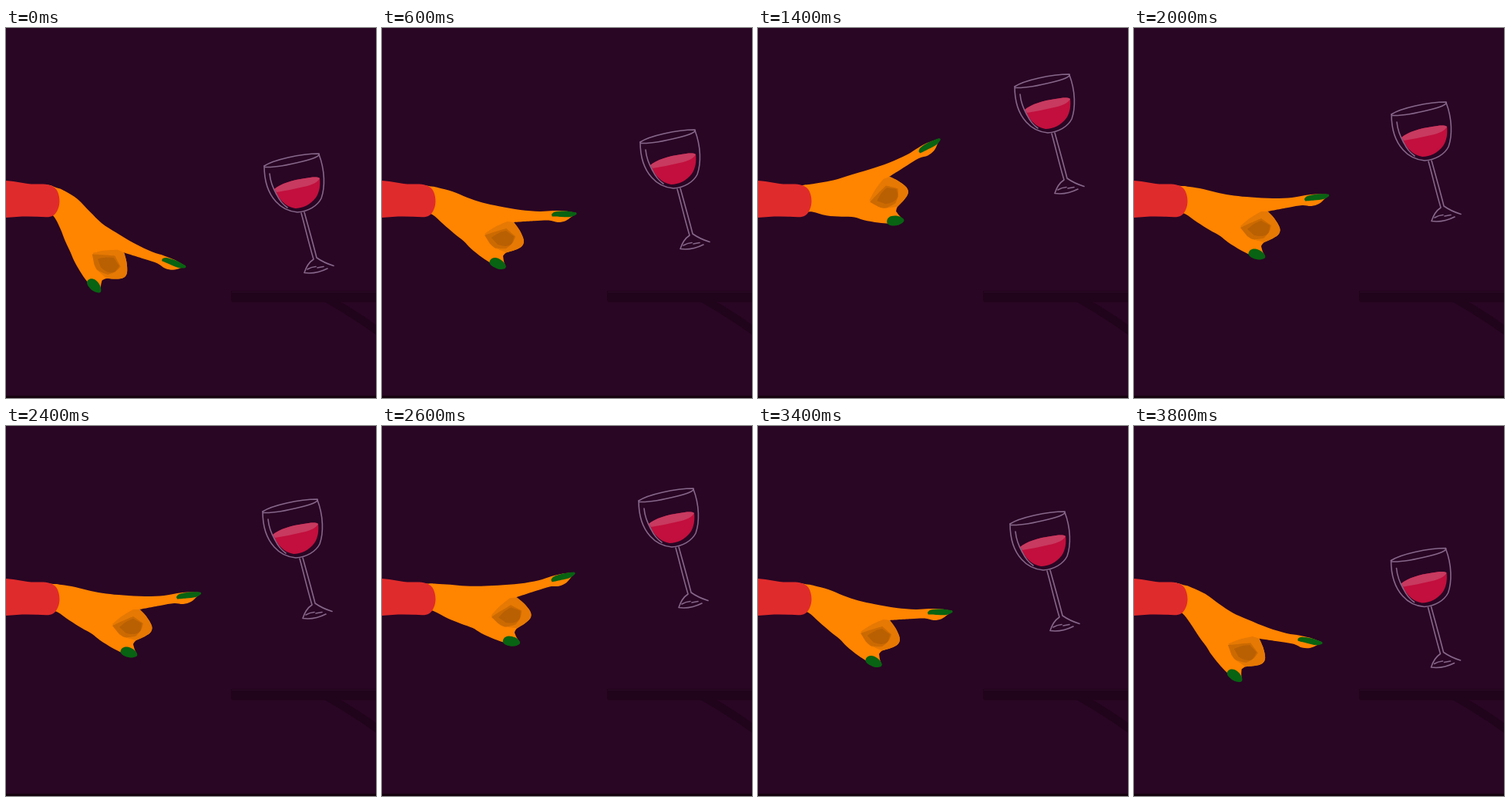
An HTML page for the animation above (4000 ms loop, 480x480 px).

```html
<!DOCTYPE html>
<html lang="en">
<head>
<meta charset="utf-8">
<title>Floating glass</title>
<style>
  html, body { margin: 0; width: 100%; height: 100%; overflow: hidden; background: #290624; }
  svg { display: block; width: 100vw; height: 100vh; }
  .line { fill: none; stroke: #86678a; stroke-width: 1.6; stroke-linecap: round; stroke-linejoin: round; }
</style>
</head>
<body>
<svg viewBox="0 0 480 480">
  <rect width="480" height="480" fill="#290624"/>
  <rect y="477" width="480" height="3" fill="#16020f"/>

  <g fill="#20041b">
    <path d="M411 354 L432 354 Q458 369 480 385 L480 398 Q448 375 411 354Z"/>
    <path d="M292 341 H480 V355.500 H294 Q292 355 292 353Z"/>
    <path d="M293 342.500 H480" stroke="#2b0a27" stroke-width="1"/>
  </g>

  <g id="hand">
    <path id="skin" fill="#ff8400"/>
    <path id="curl" fill="#e67903"/>
    <path id="shade" fill="#cc6a02"/>
    <path id="core" fill="#b96003"/>
    <path id="indexNail" fill="#086312"/>
    <path id="thumbNail" fill="#086312"/>
  </g>
  <path fill="#e02b2c" d="M0 198 C14 199 26 203 40 202.500 C52 202 60 203 65 209 C70 216 71 228 67 236 C64 243 59 245.500 52 245.300 C34 244 16 244 0 246Z"/>

  <g id="glass">
    <path fill="#c20f3d" d="M348 209 C356 202 372 197 388 195 C396 193.500 404 192.500 407 195 C408 203 407 213 402 220 C395 229 385 234 375 234 C362 232 353 221 348 209Z"/>
    <path fill="#c83a60" d="M348 209 C356 202 372 197 388 195 C396 193.500 404 192.500 407 195 C405 200 396 204 386 206 C374 209 362 211 351 213Z"/>
    <path class="line" d="M335 179 C347 171 382 163 406 163 C408 166 398 170 385 173 C365 178 346 181 336 180.500"/>
    <path class="line" d="M335 179 C335 198 340 214 350 225 C357 233 367 238 378 239 C392 238 404 231 409 221 C414 207 414 185 406 164"/>
    <path class="line" d="M342 189 C343 200 347 209 351 216 C355 224 359 229 365 233" stroke-width="1.2"/>
    <path class="line" d="M383 240 C388 258 393 280 399 300 C393 304 389 311 387 317.500 C398 319 409 316 417 312"/>
    <path class="line" d="M387 239 C392 257 398 278 403 298 C410 303 417 306 425 308.500"/>
    <path class="line" d="M391 313 Q396 310 402 309.500 M404 311 L412 309.500" stroke-width="1.2"/>
  </g>
</svg>
<script>
const STEP = 200;
const WRIST = [55, 223.5];

// Hand drawn level, as x,y pairs; "!" after a pair marks a sharp corner.
const shapes = {
  skin: "46,207 62,205 72,206 90,209 110,214 130,217.5 152,219.5 180,221 205,220 222,217 236,215.5 252,216! " +
        "247,222 240,228 230,231 218,230 200,233 173,238! 182,247 189,259 188,267 180,273 169,278 " +
        "165,283! 167,290 170,296! 160,299 150,294 138,288 122,278 112,270 98,262 82,252 66,241 50,237",
  curl: "138,257! 150,247 165,238! 174,238! 182,247 189,259 188,267 180,273 169,278! 153,274!",
  shade: "138,259! 151,253 165,247! 178,256! 175,265 168,273! 154,274 146,269!",
  core: "147,261! 156,254 165,250! 176,256! 174,266 166,270 156,269!",
  indexNail: "221,222! 225,218 238,215.5 252,215.5! 253,218 246,222 234,223.5 222,224.5!",
  thumbNail: "148.5,293 151,288 157,286.5 165,289.5 170,295 169,299 161,300.5 152,297.5"
};

const tilts = [27.8, 19, 13, 6.9, 0, -7.6, -15, -21.8];
const poses = [0, 1, 2, 3, 4, 5, 6, 7, 6, 5, 4, 3, 4, 5, 6, 5, 4, 3, 2, 1];
const glassX = [0, 0, 0, 0, -1, -1.5, -2, -2, -2, 0, -1, -1, -2, -2, -3, -4, -5, -8, -8, -1.5];
const glassY = [0, -9, -18, -31, -45, -57, -85, -103, -94, -82, -67, -53, -68, -82, -97, -84, -68, -52, -36, -4.5];

const parts = Object.entries(shapes).map(([id, text]) => ({
  el: document.getElementById(id),
  pts: text.split(" ").map(p => ({ xy: p.replace("!", "").split(",").map(Number), sharp: p.endsWith("!") }))
}));

// The bend eases in near the wrist and is rigid further out.
function bend([x, y], tilt) {
  const dx = x - WRIST[0], dy = y - WRIST[1];
  const a = tilt * Math.min(1, 0.35 + Math.hypot(dx, dy) / 100) * Math.PI / 180;
  const c = Math.cos(a), s = Math.sin(a);
  return [WRIST[0] + dx * c - dy * s, WRIST[1] + dx * s + dy * c];
}

function outline(pts, tilt) {
  const n = pts.length;
  const at = pts.map(p => bend(p.xy, tilt));
  const slope = (i, axis) => pts[i].sharp ? 0 : (at[(i + 1) % n][axis] - at[(i + n - 1) % n][axis]) / 6;
  const fmt = (x, y) => x.toFixed(2) + " " + y.toFixed(2) + " ";
  let d = "M" + fmt(...at[0]);
  for (let i = 0; i < n; i++) {
    const j = (i + 1) % n, [x, y] = at[i], [u, v] = at[j];
    d += "C" + fmt(x + slope(i, 0), y + slope(i, 1)) + fmt(u - slope(j, 0), v - slope(j, 1)) + fmt(u, v);
  }
  return d + "Z";
}

const glass = document.getElementById("glass");
let shown = -1;

function draw(now) {
  const i = Math.floor(now / STEP) % poses.length;
  if (i !== shown) {
    shown = i;
    for (const { el, pts } of parts) el.setAttribute("d", outline(pts, tilts[poses[i]]));
    glass.setAttribute("transform", `translate(${glassX[i]} ${glassY[i]})`);
  }
}

const start = performance.now();
function tick() {
  draw(performance.now() - start);
  requestAnimationFrame(tick);
}
tick();
</script>
</body>
</html>
```
